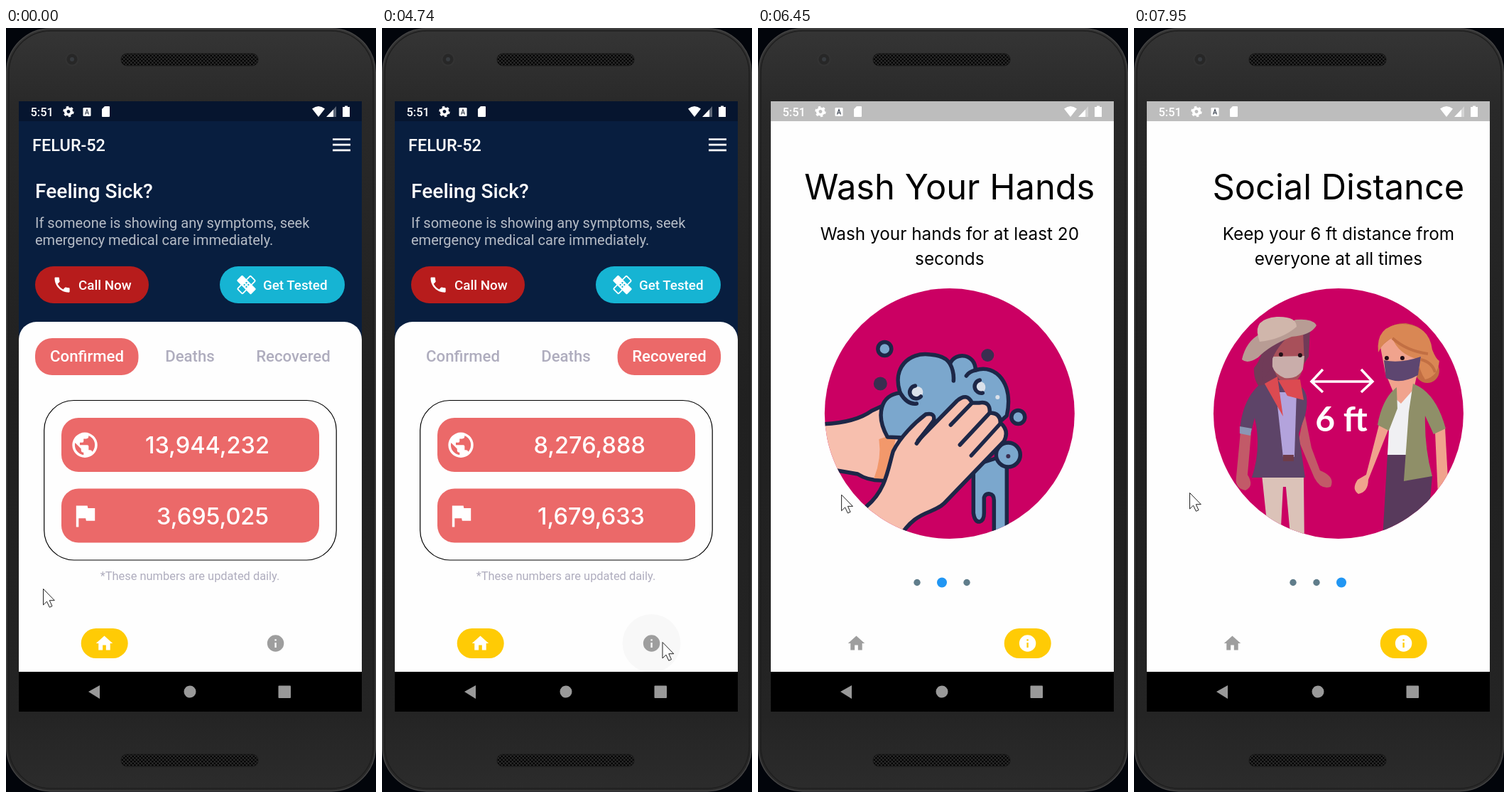
Recreate the animation shown at these times as an HTML page. Size 521 by 1074 pixels, loop 8000 ms.

```html
<!DOCTYPE html>
<html lang="en">
<head>
<meta charset="utf-8">
<title>Health app walkthrough</title>
<style>
html, body { margin: 0; width: 100%; height: 100%; overflow: hidden; background: #000; }
svg { display: block; width: 100%; height: 100%; }
text { font-family: Roboto, sans-serif; font-weight: 500; fill: #fff; }
.mid text, text.mid { text-anchor: middle; }
.nums text { font: 500 32.5px Inter, sans-serif; font-optical-sizing: none; text-anchor: end; }
.page text { font: 400 24.3px Inter, sans-serif; font-optical-sizing: none; text-anchor: middle; fill: #000; }
.page .title { font-size: 48.8px; }
.page .feet { font: 700 48px Lato, sans-serif; fill: #fff; }
.ink { stroke: #1d2747; stroke-width: 5.5; stroke-linecap: round; stroke-linejoin: round; }
</style>
</head>
<body>
<svg viewBox="0 0 521 1074" preserveAspectRatio="none">
<defs>
  <linearGradient id="shell" x2="0" y2="1">
    <stop stop-color="#353535"/><stop offset=".1" stop-color="#292929"/>
    <stop offset=".5" stop-color="#202020"/><stop offset=".9" stop-color="#242424"/>
    <stop offset="1" stop-color="#2c2c2c"/>
  </linearGradient>
  <pattern id="mesh" width="5" height="5" patternUnits="userSpaceOnUse">
    <rect width="5" height="5" fill="#282828"/>
    <circle cx="1.3" cy="1.3" r="1.3"/><circle cx="3.8" cy="3.8" r="1.3"/>
  </pattern>
  <clipPath id="screen"><rect x="18" y="103" width="483" height="802"/></clipPath>
  <clipPath id="disc"><circle cx="259.5" cy="542" r="176"/></clipPath>
  <path id="phone" d="M6.6 10.8c1.4 2.8 3.8 5.1 6.6 6.6l2.2-2.2q.5-.4 1-.2c1.1.4 2.3.5 3.6.5.6 0 1 .5 1 1V20c0 .6-.4 1-1 1C10.6 21 3 13.4 3 4c0-.6.4-1 1-1h3.5c.6 0 1 .4 1 1 0 1.3.2 2.5.6 3.6q.2.5-.3 1z"/>
  <path id="globe" d="M12 2a10 10 0 1 0 0 20 10 10 0 0 0 0-20zm-1 17.93A8 8 0 0 1 4.21 10.21L9 15v1a2 2 0 0 0 2 2zm6.9-2.54A2 2 0 0 0 16 16h-1v-3a1 1 0 0 0-1-1H8v-2h2a1 1 0 0 0 1-1V7h2a2 2 0 0 0 2-2v-.41a8 8 0 0 1 2.9 12.8z"/>
  <path id="flag" d="M14.4 6 14 4H5v17h2v-7h5.6l.4 2h7V6z"/>
  <path id="house" d="M10 20v-6h4v6h5v-8h3L12 3 2 12h3v8z"/>
  <path id="info" d="M12 2a10 10 0 1 0 0 20 10 10 0 0 0 0-20zm1 15h-2v-6h2zm0-8h-2V7h2z"/>
</defs>

<!-- phone shell -->
<rect width="521" height="1074" fill="#02050b"/>
<rect x=".7" y=".7" width="519.6" height="1072" rx="62" fill="url(#shell)" stroke="#444" stroke-width="1.4"/>
<rect x="4" y="4" width="513" height="1065" rx="59" fill="none" stroke="#1f1f1f" stroke-width="1.5"/>
<rect x="162" y="36" width="193" height="17" rx="8" fill="url(#mesh)" stroke="#1a1a1a"/>
<rect x="162" y="1021" width="193" height="17" rx="8" fill="url(#mesh)" stroke="#1a1a1a"/>
<circle cx="93" cy="44" r="10" fill="#333"/>
<circle cx="93" cy="44" r="7.5" fill="#272727"/><circle cx="93" cy="44" r="3" fill="#373b3f"/>

<g clip-path="url(#screen)">
  <g id="home">
    <rect x="18" y="103" width="483" height="340" fill="#081e3f"/>
    <rect x="18" y="103" width="483" height="28" fill="#06152f"/>
    <text x="37" y="173" font-size="23.46">FELUR-52</text>
    <path d="M460 156.5h25m-25 7.7h25m-25 7.7h25" stroke="#fff" stroke-width="2.7"/>
    <text x="41" y="239" font-size="28.15">Feeling Sick?</text>
    <g font-size="20" opacity=".7">
      <text x="41" y="280.5" style="font-weight:400">If someone is showing any symptoms, seek</text>
      <text x="41" y="304.5" style="font-weight:400">emergency medical care immediately.</text>
    </g>
    <rect x="41" y="335" width="160" height="52" rx="26" fill="#b71c1c"/>
    <rect x="301" y="335" width="176" height="52" rx="26" fill="#16b4d3"/>
    <use href="#phone" transform="translate(65 347)scale(1.173)" fill="#fff"/>
    <g transform="translate(338.5 361)rotate(45)" fill="#fff">
      <rect x="-5" y="-13" width="10" height="26" rx="1.5" fill="none" stroke="#fff" stroke-width="1.8"/>
      <rect x="-14" y="-5.5" width="28" height="11" rx="1.5"/>
      <g fill="#16b4d3"><circle cx="-2" cy="-2" r="1.2"/><circle cx="2" cy="-2" r="1.2"/><circle cx="-2" cy="2" r="1.2"/><circle cx="2" cy="2" r="1.2"/></g>
    </g>
    <g font-size="18.77"><text x="102" y="368">Call Now</text><text x="362" y="368">Get Tested</text></g>

    <rect x="18" y="413" width="483" height="540" rx="25" fill="#fefefe"/>
    <rect id="tab" y="436" width="145.5" height="52" rx="24" fill="#eb6969"/>
    <g id="tabs" class="mid" font-size="22.2">
      <text x="114" y="469">Confirmed</text><text x="259" y="469">Deaths</text><text x="404.5" y="469">Recovered</text>
    </g>
    <rect x="53.7" y="523.5" width="411.5" height="224.5" rx="42" fill="none" stroke="#000" stroke-width="1.2"/>
    <rect x="78" y="548" width="363" height="76" rx="24" fill="#eb6969"/>
    <rect x="78" y="647.5" width="363" height="76" rx="24" fill="#eb6969"/>
    <use href="#globe" transform="translate(89.8 565)scale(1.77)" fill="#fff"/>
    <use href="#flag" transform="translate(90 664.5)scale(1.76)" fill="#fff"/>
    <g class="nums"><text id="world" x="371" y="598"/><text id="nation" x="370" y="698"/></g>
    <text class="mid" x="259" y="775.5" font-size="16.42" style="font-weight:400;fill:#afadbe">*These numbers are updated daily.</text>
  </g>

  <g id="tips">
    <rect x="18" y="103" width="483" height="803" fill="#fefefe"/>
    <rect x="18" y="103" width="483" height="28" fill="#bdbdbd"/>
    <g id="strip">
      <g class="page">
        <text class="title" x="259.5" y="241">Wear A Mask</text>
        <text x="259.5" y="297.5">Cover your mouth and nose when</text>
        <text x="259.5" y="332.5">around others</text>
        <g clip-path="url(#disc)"><g transform="translate(211)">
          <rect x="-130" y="365" width="360" height="354" fill="#cb0063"/>
          <path d="M45 388C105 386 137 425 137 475L138 550C165 570 172 600 163 640L120 632 60 560-47 560V475C-47 425-15 390 45 388z"/>
          <path d="M-140 725C-95 665-70 630-10 630H102Q145 634 185 675L200 725z" fill="#33cccc"/>
          <path d="M3 600H87V640Q86 676 45 685 4 676 3 640z" fill="#75341e"/>
          <path d="M45 633Q70 628 87 605V650L70 678 45 640z" fill="#54230f"/>
          <g fill="#75341e"><ellipse cx="137" cy="532" rx="17" ry="26"/><ellipse cx="-47" cy="532" rx="17" ry="26" fill="#a04626"/></g>
          <g fill="#54230f"><ellipse cx="136" cy="532" rx="8" ry="15"/><ellipse cx="-46" cy="532" rx="8" ry="15"/></g>
          <path d="M45 460 78 441C92 468 112 490 131 503V540Q122 575 100 595L45 633z" fill="#75341e"/>
          <path d="M45 460Q-10 475-41 503V540Q-30 575-10 595L45 633z" fill="#a04626"/>
          <path d="M101 557Q113 520 139 507M-11 557Q-23 520-49 507M101 597Q125 575 131 545M-11 597Q-35 575-41 545" fill="none" stroke="#bcdde5" stroke-width="4"/>
          <path d="M-11 552H101V597Q85 633 45 633 5 633-11 597z" fill="#bcdde5"/>
          <path d="M4 581H86M4 594H86M10 607H80" stroke="#8dccd8" stroke-width="2"/>
          <path d="M78 500Q90 496 98 502V507H80zM12 500Q0 496-8 502V507H10z"/>
          <ellipse cx="88" cy="528" rx="8.5" ry="6.5"/><ellipse cx="2" cy="528" rx="8.5" ry="6.5"/>
        </g></g>
      </g>
      <g class="page" transform="translate(482.5)">
        <text class="title" x="259.5" y="241">Wash Your Hands</text>
        <text x="259.5" y="297.5">Wash your hands for at least 20</text>
        <text x="259.5" y="332.5">seconds</text>
        <g clip-path="url(#disc)">
          <rect x="80" y="365" width="360" height="354" fill="#cb0063"/>
          <g class="ink" fill="#f7bfae">
            <path d="M75 557Q125 556 150 538L172 528 190 580 168 636Q145 637 130 627L95 621z"/>
            <path d="M160 578 185 570 172 634 153 633Q164 605 160 578z" fill="#f2986b" stroke="none"/>
            <g fill="#7ba7cd">
              <path d="M293 615V682Q295 695 302 694 308 692 308 682V660Q310 654 316 655 322 656 322 664V715H340V600z"/>
              <circle cx="342" cy="600" r="17"/>
              <path d="M172 575C155 545 162 515 190 513 178 478 202 455 232 459 248 460 256 465 260 472 268 454 296 458 296 481 325 472 350 500 340 545L300 580z"/>
            </g>
            <path d="M260 472Q266 483 265 496M296 481Q287 483 283 489M190 513Q200 530 213 528" fill="none"/>
            <g stroke="none" fill="#dbe1ea"><circle cx="214" cy="512" r="8"/><circle cx="302" cy="505" r="8"/><circle cx="327" cy="519" r="3"/></g>
            <path d="M211 503A9 9 0 1 0 219 518M302 495A9 9 0 1 0 306 513" fill="none"/>
            <path d="M120 700 143 672C170 650 173 618 180 595 190 575 210 555 226 543Q240 540 237 553L215 580 270 524Q284 512 291 527L301 527Q317 524 316 541 331 541 331 555 344 566 336 581L252 668C235 685 212 675 185 722z"/>
            <path d="M237 552 213 584M291 527 261 558M316 541 274 586M331 556 290 601" fill="none"/>
            <g fill="#7ba7cd"><circle cx="168" cy="451" r="9.5"/><circle cx="356" cy="547" r="9.5"/></g>
          </g>
          <g fill="#3a2e50"><circle cx="313" cy="460" r="9"/><circle cx="162" cy="500" r="9.5"/><circle cx="342" cy="602" r="3"/></g>
        </g>
      </g>
      <g class="page" transform="translate(965)">
        <text class="title" x="259.5" y="241">Social Distance</text>
        <text x="259.5" y="297.5">Keep your 6 ft distance from</text>
        <text x="259.5" y="332.5">everyone at all times</text>
        <g clip-path="url(#disc)"><g transform="translate(-28.5)">
          <rect x="108" y="365" width="360" height="354" fill="#cb0063"/>
          <path d="M250 497H336M266 480 250 497 266 512M320 480 336 497 320 512" fill="none" stroke="#fff" stroke-width="3.5"/>
          <text class="feet" x="292" y="567">6 ft</text>

          <path d="M185 425Q183 462 169 478 168 505 190 514 212 520 218 505L246 462 248 425z" fill="#703b58"/>
          <path d="M200 425H238L240 470Q235 500 215 502 196 492 195 465z" fill="#a8505a"/>
          <path d="M195 462 240 461 238 480Q230 494 212 492 198 486 195 476z" fill="#c9adaa"/>
          <path d="M185 430 235 420Q205 440 195 465 192 485 180 498z" fill="#703b58"/>
          <path d="M152 466Q158 440 178 430L228 410Q252 408 257 418 250 432 222 434 190 447 175 463 160 473 152 466z" fill="#b89c94"/>
          <path d="M175 434Q168 409 201 406 229 405 229 420 208 438 177 441z" fill="#d0b6ab"/>
          <path d="M180 627H239L240 722H221L214 645H210L206 722H190z" fill="#dbc2b8"/>
          <g fill="#c25a68">
            <path d="M150 568 165 570 160 628Q170 644 157 650 142 647 144 632z"/>
            <path d="M240 540 250 590 262 622Q284 631 277 645 262 650 253 630L232 580z"/>
          </g>
          <path d="M175 503 205 498 236 505Q248 515 241 545L232 570 241 632H166Q180 590 170 548L164 572 149 567Q152 525 175 503z" fill="#5d4468"/>
          <path d="M149 560 166 563 164 573 149 570z" fill="#8b97b4"/>
          <path d="M200 512H229L226 603H210z" fill="#b3a3dc"/>
          <path d="M184 500 202 490 210 546zM203 495 234 494 239 523 216 517z" fill="#dc4a51"/>
          <rect x="210" y="600" width="15" height="9" fill="#6e3c4a"/>

          <path d="M357 600H390L420 630 412 720H350z" fill="#583a5c"/>
          <g fill="#f0a38d">
            <path d="M345 558 358 565 330 635Q330 652 316 655 306 648 315 635L327 628z"/>
            <path d="M424 566 438 560 443 650 428 655z"/>
          </g>
          <g fill="#c26f43"><circle cx="413" cy="482" r="17"/><path d="M350 450Q345 415 383 415 420 420 420 465L404 492 380 470z"/></g>
          <path d="M347 448 372 428 398 450 404 470Q396 495 394 510L374 533 354 485z" fill="#f0a38d"/>
          <path d="M362 515 376 528 392 510 388 600H357z" fill="#f0f0f3"/>
          <path d="M393 500Q425 512 439 563L422 571 410 545Q409 590 420 630L380 637 387 540zM370 505Q350 520 343 558L359 566 371 535z" fill="#8f8f68"/>
          <path d="M344 456Q340 418 378 416 416 418 420 452 425 465 430 468 428 490 410 494 402 482 400 466 372 458 364 436 352 440 344 456z" fill="#d98754"/>
          <path d="M364 436Q384 454 414 458M404 466Q420 470 424 484" fill="none" stroke="#c26f43" stroke-width="4"/>
          <path d="M352 467Q375 472 404 462L400 488Q375 502 355 492z" fill="#5d4670"/>
          <g fill="#210f17"><circle cx="207" cy="459" r="3"/><circle cx="234" cy="460" r="3"/><circle cx="356" cy="464" r="3"/><circle cx="378" cy="464" r="3"/></g>
        </g></g>
      </g>
    </g>
    <g id="dots"><circle cy="779.5"/><circle cy="779.5"/><circle cy="779.5"/></g>
  </g>

  <!-- status icons -->
  <text x="34.500" y="123.500" font-size="16.42">5:51</text>
  <g fill="#fff">
    <circle cx="88" cy="117.5" r="4.3" fill="none" stroke="#fff" stroke-width="3.6"/>
    <circle cx="88" cy="117.5" r="6.6" fill="none" stroke="#fff" stroke-width="2.2" stroke-dasharray="3.45"/>
    <rect x="108.5" y="112" width="11" height="12" rx="1.2"/>
    <path d="m111.500 121.500 2.500-7 2.500 7m-4-2h3" fill="none" stroke="#444b58" stroke-width="1.2"/>
    <path d="M139 110h6q1 0 1 1v13q0 1-1 1h-9q-1 0-1-1v-10z"/>
    <path d="M431 113.500q9-7 18 0L440 125zM461 114.500V125H451z"/>
    <path d="M461 114.500 465 110v15h-4z" opacity=".35"/>
    <path d="M477 109.500h4V111h3v14h-10V111h3z"/>
  </g>

  <!-- bottom bar -->
  <circle id="ripple" cx="379.5" cy="865"/>
  <rect id="pill" y="844" width="66" height="42" rx="21" fill="#ffcb05"/>
  <use id="homeIcon" href="#house" transform="translate(124.4 851)scale(1.173)"/>
  <use id="infoIcon" href="#info" transform="translate(365.5 851)scale(1.173)"/>
</g>
<rect x="18" y="905" width="483" height="56"/>
<g fill="#999"><path d="M116 933 132 924V943z"/><circle cx="259" cy="933" r="8.5"/><rect x="383.5" y="924.5" width="17.5" height="17.5" rx="1"/></g>

<g id="cursor">
  <path d="M.5.5V23L5.500 18.200 9.300 26.300 13 24.700 9.300 16.700H16.300z" fill="#fff" stroke="#222"/>
  <circle id="press" r="16.8" fill="#ff0" opacity=".47"/>
</g>
</svg>
<script>
const LOOP = 8000, PAGE = 482.5, SLOP = 21, INFO_AT = 4830;
const $ = id => document.getElementById(id);
const set = (el, attrs) => { for (const k in attrs) el.setAttribute(k, attrs[k]); };
const show = (el, on) => { el.style.display = on ? '' : 'none'; };
const ramp = (t, a, b) => Math.min(1, Math.max(0, (t - a) / (b - a)));
const ease = u => u * u * (3 - 2 * u);

// time, x, y of the pointer tip
const path = [
  [460, 52, 788], [1240, 226, 509], [1320, 226, 509], [1460, 218, 467],
  [2390, 218, 467], [2940, 393, 466], [3640, 393, 466], [4190, 394.5, 863],
  [4950, 394.5, 863], [5040, 393, 853], [5450, 329, 640], [5560, 329, 640],
  [6090, 73, 662], [6300, 73, 662], [6900, 352, 622], [7060, 352, 622], [7620, 78, 653]
];
const presses = [[1700, 1780], [3090, 3170], [4420, 4500], [5500, 6100], [7060, 7695]];
const drags = [[5560, 6100], [7060, 7695]];
const counts = [['13,944,232', '3,695,025'], ['592,631', '141,118'], ['8,276,888', '1,679,633']];

function pointer(t) {
  const i = path.findIndex(k => k[0] > t);
  if (i === 0) return path[0].slice(1);
  if (i < 0) return path[path.length - 1].slice(1);
  const [a, x, y] = path[i - 1], [b, X, Y] = path[i], u = ease(ramp(t, a, b));
  return [x + (X - x) * u, y + (Y - y) * u];
}

// The page follows the finger, then a damped spring settles it.
function scroll(t) {
  return drags.reduce((sum, [down, up]) => {
    if (t < down) return sum;
    const moved = Math.max(0, pointer(down)[0] - pointer(Math.min(t, up))[0] - SLOP);
    if (t < up) return sum + moved;
    const w = (t - up) * .01414;
    return sum + PAGE - (PAGE - moved) * (1 + w) * Math.exp(-w);
  }, 0);
}

function draw(t) {
  const onInfo = t >= INFO_AT;
  show($('home'), !onInfo);
  show($('tips'), onInfo);

  const slide = ease(ramp(t, 1980, 2240)) + ease(ramp(t, 3380, 3640));
  set($('tab'), { x: 41 + 145.3 * slide });
  [...$('tabs').children].forEach((label, i) => {
    const near = Math.max(0, 1 - Math.abs(slide - i));
    label.style.fill = `rgb(${[175, 173, 190].map(c => c + (255 - c) * near)})`;
  });
  const [world, nation] = counts[(t >= 2010) + (t >= 3410)];
  $('world').textContent = world;
  $('nation').textContent = nation;

  const offset = scroll(t), active = Math.round(offset / PAGE);
  set($('strip'), { transform: `translate(${-offset})` });
  [...$('dots').children].forEach((dot, i) => {
    const on = i === active;
    set(dot, { cx: 219 + 33 * i + (i > active ? 4 : 0) + (on ? 7 : 5), r: on ? 7 : 4.7, fill: on ? '#2196f3' : '#607d8b' });
  });

  set($('ripple'), { r: 41 * ease(ramp(t, 4500, 4740)), opacity: .025 * (1 - ramp(t, INFO_AT, 5040)) });
  set($('pill'), { x: onInfo ? 346.7 : 105.7 });
  set($('homeIcon'), { fill: onInfo ? '#9e9e9e' : '#fff' });
  set($('infoIcon'), { fill: onInfo ? '#fff' : '#9e9e9e' });

  set($('cursor'), { transform: `translate(${pointer(t)})` });
  show($('press'), presses.some(([a, b]) => t >= a && t < b));
}

const start = performance.now();
function tick() {
  draw((performance.now() - start) % LOOP);
  requestAnimationFrame(tick);
}
tick();
</script>
</body>
</html>
```
